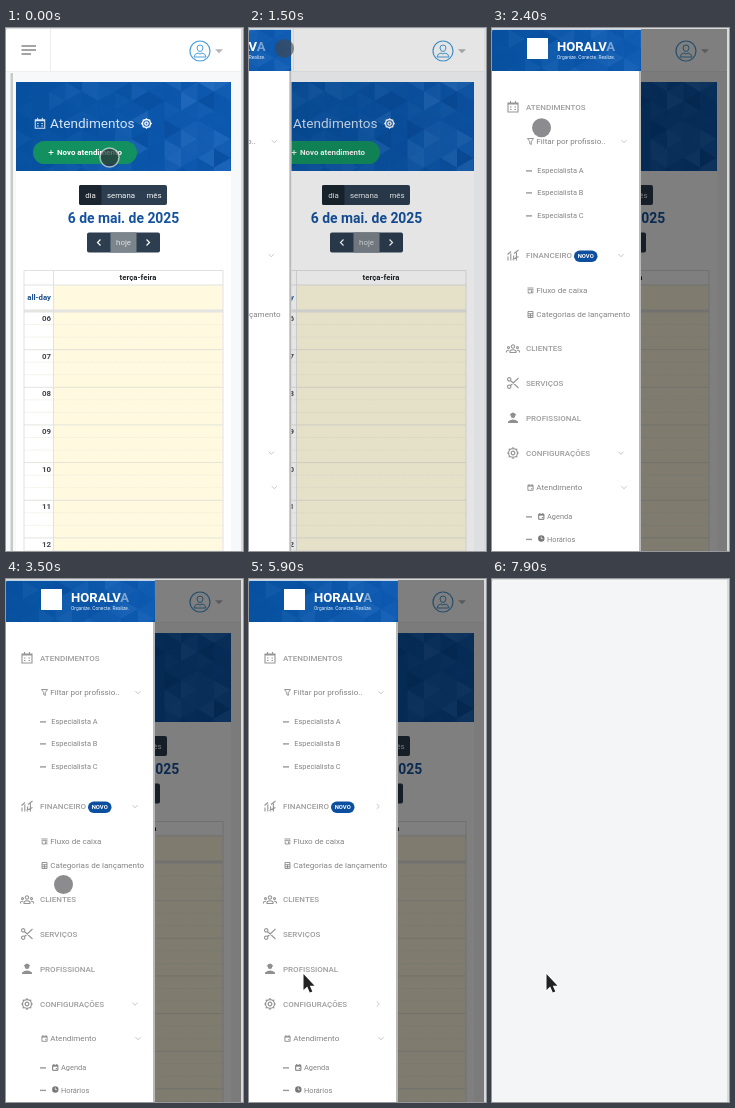
An HTML page for the animation above (8000 ms loop, 237x523 px).

```html
<!DOCTYPE html>
<html lang="pt-BR">
<head>
<meta charset="utf-8">
<title>Agenda</title>
<style>
  html, body { margin: 0; height: 100%; overflow: hidden; background: #f4f5f7; }
  svg { display: block; width: 237px; height: 523px; font-family: Roboto, sans-serif; }
</style>
</head>
<body>
<svg id="stage" viewBox="0 0 237 523"></svg>
<script>
const LOOP = 8000;

// ---------- drawing helpers ----------
const rect = (x, y, w, h, fill, extra = '') =>
  `<rect x="${x}" y="${y}" width="${w}" height="${h}" fill="${fill}" ${extra}/>`;
const line = (d, color, width = 1, extra = '') =>
  `<path d="${d}" fill="none" stroke="${color}" stroke-width="${width}" ${extra}/>`;
// y is the vertical middle of the capitals
const text = (x, y, str, size, fill, weight = 400, anchor = 'start') =>
  `<text x="${x}" y="${y + size * 0.356}" font-size="${size}" fill="${fill}" font-weight="${weight}" text-anchor="${anchor}">${str}</text>`;
const group = (x, y, content) => `<g transform="translate(${x} ${y})">${content}</g>`;

// Blue panel with a faint triangular mosaic, stronger towards the right
function mosaic(x, y, w, h, seed) {
  const random = () => (seed = (seed * 16807) % 2147483647) / 2147483647;
  const side = 19, step = 16.5;
  let out = rect(0, 0, w, h, 'url(#blue)');
  for (let col = 0; col * step < w; col++) {
    for (let row = -1; row * side / 2 < h; row++) {
      const left = col * step, top = row * side / 2;
      const points = (col + row) % 2
        ? `${left},${top} ${left + step},${top + side / 2} ${left},${top + side}`
        : `${left + step},${top} ${left},${top + side / 2} ${left + step},${top + side}`;
      const strength = random() ** 2 * (0.05 + 0.17 * left / w);
      const tone = random() < 0.8 ? '#7fbcff' : '#00296b';
      out += `<polygon points="${points}" fill="${tone}" opacity="${strength.toFixed(3)}"/>`;
    }
  }
  return `<svg x="${x}" y="${y}" width="${w}" height="${h}">${out}</svg>`;
}

// Icons are centred on 0,0
const gearTeeth = [...Array(8)].map((_, i) => {
  const a = i * Math.PI / 4, c = Math.cos(a), s = Math.sin(a);
  return `M${c * 3.6} ${s * 3.6}L${c * 5.3} ${s * 5.3}`;
}).join('');
const icons = {
  calendar: 'M-5-4H5V5H-5ZM-5-3H5M-2.5-6V-3M2.5-6V-3M-3 0H-1.5M1.5 0H3M-3 2.5H-1.5M1.5 2.5H3',
  gear: gearTeeth + 'M-4 0A4 4 0 1 1 4 0A4 4 0 1 1-4 0M-1.6 0A1.6 1.6 0 1 1 1.6 0A1.6 1.6 0 1 1-1.6 0',
  finance: 'M-5 5V1M-2.2 5V-2M.6 5V0M3.4 5V-3M-5.5-1L-2-4M1-2L5.5-5.5M-.5 4L5.500 1',
  people: 'M-1.7-2A1.7 1.7 0 1 1 1.7-2A1.7 1.7 0 1 1-1.7-2M-3 4V2.5Q0 0 3 2.5V4ZM-5.5-1A1 1 0 1 1-3.5-1A1 1 0 1 1-5.5-1M3.5-1A1 1 0 1 1 5.5-1A1 1 0 1 1 3.5-1M-6.5 4V2.5L-4 1.5M6.5 4V2.5L4 1.5',
  scissors: 'M-2.5-2.5L5.5 5M-2.5 2.5L5.5-5M-5.5-3.7A1.7 1.7 0 1 1-2.1-3.7A1.7 1.7 0 1 1-5.5-3.7M-5.5 3.7A1.7 1.7 0 1 1-2.1 3.7A1.7 1.7 0 1 1-5.5 3.7',
  filter: 'M-3-3H3L.8 0V3L-.8 2V0Z',
  shop: 'M-3-2.5H3M-3-.8H3M-2.3 0V2.5H1V0M2.3 0V3',
  grid: 'M-2.5-3H2.5V3H-2.5ZM-2.5-.8H2.5M-2.5 1.2H2.5M0-.8V3',
  event: 'M-2.6-2.2H2.6V2.8H-2.6ZM-2.6-1.4H2.6M-1.5-3.4V-2M1.5-3.4V-2M.5 1.2H1.8',
};
const icon = (name, x, y, color, width = 1.2, scale = 1) =>
  group(x, y, `<g transform="scale(${scale})">${line(icons[name], color, width)}</g>`);
const chevron = (x, y, extra = '') =>
  group(x, y, `<g ${extra}>${line('M-2.5-1.3L0 1.3L2.5-1.3', '#c0c0c0', 0.9)}</g>`);

// ---------- calendar page ----------
function header() {
  return rect(0, 0, 237, 43.5, '#fff') + rect(44, 0, 1, 43, '#ececee') + rect(0, 43, 235, 1, '#eeeff1') +
    line('M15.5 18H30M15.5 22H30M15.5 26H25', '#868686', 1.5) +
    '<circle cx="194" cy="23" r="10" fill="#fff" stroke="#4a9edb" stroke-width="1.2"/>' +
    line('M191 20A3 3 0 1 1 197 20Q196.500 23.500 194 23.500Q191.500 23.500 191 20M188 29Q188.500 25.500 192 25L194 26L196 25Q199.500 25.500 200 29Z', '#4a9edb') +
    '<path d="M209 21.300H217L213 25.300Z" fill="#b5b5b5"/>';
}

function banner() {
  return mosaic(10, 54, 215, 89, 77) +
    icon('calendar', 34, 95.5, '#d7e6f7', 1.1, 0.95) +
    text(44, 95.5, 'Atendimentos', 13.6, '#d4e4f6') +
    icon('gear', 140.5, 95.5, '#fff', 1.4) +
    rect(27, 113, 104, 23, '#12905f', 'rx="11.5"') +
    line('M42.500 124.500H47.500M45 122V127', '#fff', 0.9) +
    text(51, 124.5, 'Novo atendimento', 7.9, '#fff', 700);
}

function toolbar() {
  return rect(73, 157, 88, 20, '#2c3e50', 'rx="2"') + rect(73, 157, 22.5, 20, '#1a252f', 'rx="2"') +
    [[84.5, 'dia'], [115, 'semana'], [148, 'mês']]
      .map(([x, label]) => text(x, 167, label, 7.9, '#f2f4f6', 400, 'middle')).join('') +
    text(117.5, 190, '6 de mai. de 2025', 13.9, '#1452a0', 700, 'middle') +
    rect(81, 204.5, 73, 20, '#2c3e50', 'rx="2"') + rect(104.5, 204.5, 26, 20, '#7d858c') +
    text(117.5, 214.5, 'hoje', 7.9, '#dfe3e6', 400, 'middle') +
    line('M94.500 211.500L91.500 214.500L94.500 217.500M140.500 211.500L143.500 214.500L140.500 217.500', '#fff', 1.2);
}

function timetable() {
  const hour = 37.65, top = 284;
  let out = rect(48, 257, 168.5, 25, '#fffadf') + rect(48, top, 168.5, 240, '#fffadf');
  for (let slot = 1; slot < 20; slot++) {
    const y = top + slot * hour / 3;
    out += line(`M18 ${y}H217`, slot % 3 ? '#eceadb' : '#dcdcd6', 0.8, slot % 3 ? 'stroke-dasharray="1 .5"' : '');
  }
  for (let i = 0; i < 7; i++) {
    out += text(45, 290.2 + i * hour, String(6 + i).padStart(2, '0'), 7.9, '#41454b', 700, 'end');
  }
  return out + rect(18, 281.5, 199, 3, '#e4e4e2') +
    line('M18 257H217M18 523V242.500H217V523M47.500 242.500V523', '#dedede', 0.9) +
    text(132, 249.5, 'terça-feira', 7.8, '#22262b', 700, 'middle') +
    text(45, 269.5, 'all-day', 7.8, '#1c4f8f', 700, 'end');
}

const page = rect(0, 0, 237, 523, '#f7f8f9') + rect(10, 54, 215, 470, '#fff') +
  rect(4.5, 45, 2.5, 480, '#c9c9c9') + header() + banner() + toolbar() + timetable();

// ---------- sliding menu ----------
const section = (y, label, iconName, scale = 1) =>
  icon(iconName, 21, y, '#959595', 1.1, scale) + text(34, y, label, 8, '#9d9d9d', 500);
const entry = (y, label, iconName) =>
  icon(iconName, 38.5, y, '#858585', 0.85) + text(44.3, y, label, 8.05, '#838383');
const leaf = (x, y, label) =>
  rect(34, y - 0.3, 6, 1.4, '#9a9a9a') + text(x, y, label, 7.4, '#838383');

const person = '<g fill="#8f8f8f"><circle cy="-2.200" r="2.300"/><path d="M-3.500-2.800Q0-8 3.500-2.800ZM-5 5V3.500Q0-.500 5 3.500V5Z"/></g>';

const menu = rect(0, 0, 149, 523, '#fff') +
  mosaic(0, 1.5, 149, 41.5, 1234) +
  rect(35, 10, 21, 21, '#fff') +
  text(65, 18.5, 'HORALV<tspan fill-opacity=".45">A</tspan>', 13.1, '#fff', 700) +
  text(65, 29, 'Organize. Conecte. Realize.', 4.8, '#e1eefb') +
  section(79, 'ATENDIMENTOS', 'calendar') +
  entry(113.5, 'Filtar por profissio..', 'filter') + chevron(132, 113.5) +
  leaf(45.3, 142.5, 'Especialista A') +
  leaf(45.3, 164.5, 'Especialista B') +
  leaf(45.3, 187.5, 'Especialista C') +
  section(227.5, 'FINANCEIRO', 'finance') +
  rect(82, 222.5, 23.5, 11.5, '#0c4f9f', 'rx="5.700"') +
  text(93.7, 228.2, 'NOVO', 5.9, '#fff', 700, 'middle') +
  chevron(129, 227.5, 'class="fold"') +
  entry(262.5, 'Fluxo de caixa', 'shop') +
  entry(286.5, 'Categorias de lançamento', 'grid') +
  section(320.5, 'CLIENTES', 'people') +
  section(355, 'SERVIÇOS', 'scissors') +
  group(21, 390, person) + text(34, 390, 'PROFISSIONAL', 8, '#9d9d9d', 500) +
  section(425, 'CONFIGURAÇÕES', 'gear', 1.12) + chevron(129, 425, 'class="fold"') +
  entry(459.5, 'Atendimento', 'event') + chevron(132, 459.5) +
  leaf(55, 488.5, 'Agenda') + icon('event', 49.3, 488.5, '#777', 1) +
  leaf(55, 511, 'Horários') +
  '<circle cx="49.300" cy="510.500" r="3.200" fill="#777"/>' + line('M49.300 508.500V510.700H51', '#fff', 0.7) +
  rect(147, 43, 2, 480, '#b9b9b9');

// ---------- stage ----------
const stage = document.getElementById('stage');
stage.innerHTML = `
  <defs><linearGradient id="blue"><stop stop-color="#07509f"/><stop offset="1" stop-color="#0d59b0"/></linearGradient></defs>
  ${page}
  <rect id="shade" width="237" height="523"/>
  <g id="menu">${menu}</g>
  <rect id="blank" width="237" height="523" fill="#f4f5f7"/>
  ${rect(0, 0, 237, 1, '#d9dadc')}${rect(235, 0, 2, 523, '#d9dadc')}
  <path d="M0 0H4Q0 0 0 4Z" fill="#d9dadc"/>
  <circle id="touch" r="9.500" stroke-width="1.600"/>
  <path id="arrow" d="M0 0V16L3.700 12.600L6.300 18.600L8.800 17.500L6.300 11.700H11Z" transform="translate(54.500 395)"
    fill="#222" stroke="#fff" stroke-width="1.800" paint-order="stroke"/>`;
const part = id => document.getElementById(id);
const [shade, drawer, blank, touch, arrow] = ['shade', 'menu', 'blank', 'touch', 'arrow'].map(part);
const folds = stage.querySelectorAll('.fold');

// ---------- motion ----------
const progress = (t, from, to) => Math.min(1, Math.max(0, (t - from) / (to - from)));
const easeOut = p => 1 - (1 - p) ** 3;

// time, x, y
const touchPath = [
  [0, 103.5, 129.5], [100, 103.5, 129.5], [700, 40, 44], [850, 40, 44], [1000, 35.5, 20.5],
  [2200, 35.5, 20.5], [2400, 49.5, 99.5], [2900, 76, 200], [3200, 64.5, 250.5], [3300, 58.5, 275],
  [3400, 58.5, 275], [3500, 57.5, 305.5], [3600, 57.5, 305.5], [3900, 52, 360], [4100, 55.5, 397.5], [LOOP, 55.5, 397.5],
];
function touchAt(t) {
  const next = touchPath.findIndex(key => key[0] > t);
  const [t0, x0, y0] = touchPath[next - 1], [t1, x1, y1] = touchPath[next];
  const p = progress(t, t0, t1);
  return [x0 + (x1 - x0) * p, y0 + (y1 - y0) * p];
}

function draw(t) {
  const open = easeOut(progress(t, 1450, 1925));
  drawer.setAttribute('transform', `translate(${-150 * (1 - open)} 0)`);
  shade.setAttribute('opacity', 0.5 * progress(t, 1450, 1700));

  const angle = -90 * easeOut(progress(t, 5050, 5400));
  folds.forEach(fold => fold.setAttribute('transform', `rotate(${angle})`));

  const pressed = t < 100;
  const [x, y] = touchAt(t);
  touch.setAttribute('transform', `translate(${x} ${y})`);
  touch.setAttribute('fill', pressed ? 'rgba(45,50,55,.72)' : 'rgba(70,70,72,.62)');
  touch.setAttribute('stroke', pressed ? 'rgba(205,222,222,.75)' : 'none');

  const pointer = t >= 5900;
  touch.setAttribute('visibility', pointer ? 'hidden' : 'visible');
  arrow.setAttribute('visibility', pointer ? 'visible' : 'hidden');
  blank.setAttribute('visibility', t >= 7300 ? 'visible' : 'hidden');
}

function tick() {
  draw(performance.now() % LOOP);
  requestAnimationFrame(tick);
}
tick();
</script>
</body>
</html>
```
